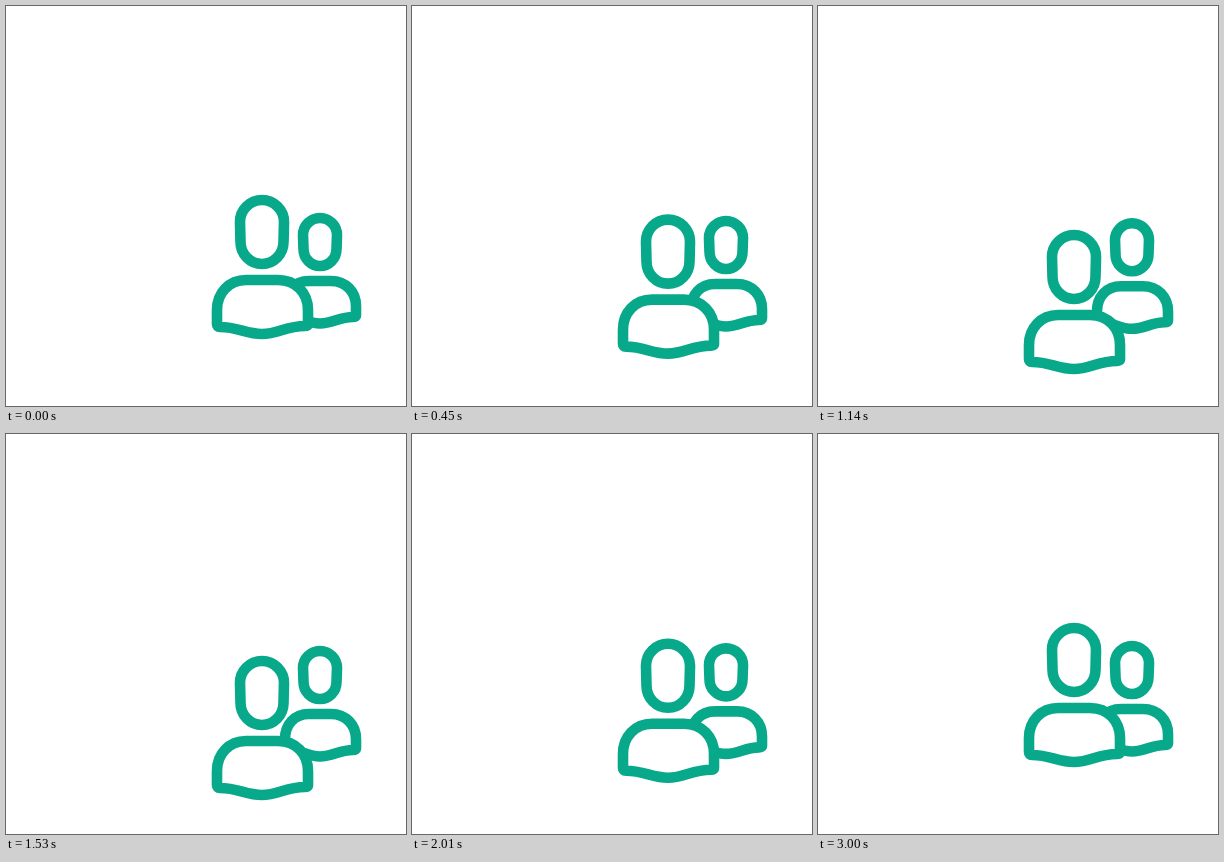
Animation, 400 px wide and 400 px high, one loop 3.03 s. Source, as an HTML page:

```html
<!DOCTYPE html>
<html lang="en">
<head>
<meta charset="utf-8">
<title>Two people</title>
<style>
  html, body { margin: 0; width: 100%; height: 100%; overflow: hidden; background: #fff; }
  svg { display: block; width: 100%; height: 100%; }
  path { fill: #fff; stroke: #08a88a; stroke-width: 10.6; stroke-linejoin: round; }
</style>
</head>
<body>
<svg viewBox="0 0 400 400">
  <g id="back">
    <path d="M297 229a17 17 0 0 1 34 0l-.5 14a16.5 17 0 0 1-33 0z"/>
    <path d="M279 309V300C279 286 288 275 303 275H325C340 275 350 286 350 300V309Q350 311 347 311C333 311 327 317.5 314 317.5S296 311 282 311Q279 311 279 309Z"/>
  </g>
  <g id="front">
    <path d="M234 216a22 22 0 0 1 44 0l-.5 20a21.5 22 0 0 1-43 0z"/>
    <path d="M211 318V304C211 287 223 274 240 274H272C290 274 302 287 302 304V318Q302 320 299 320C280 320 272 328 256 328S232 321 214 321Q211 321 211 318Z"/>
  </g>
</svg>
<script>
const LOOP = 3030, PEAK = 1200;
const back = document.getElementById('back');
const front = document.getElementById('front');

// Cubic bezier easing (.33, 0, .26, 1), solved by bisection
function ease(p) {
  let lo = 0, hi = 1, u;
  for (let i = 0; i < 24; i++) {
    u = (lo + hi) / 2;
    const x = 3 * u * (1 - u) * ((1 - u) * .33 + u * .26) + u ** 3;
    if (x < p) lo = u; else hi = u;
  }
  return u * u * (3 - 2 * u);
}

function draw(now) {
  const t = now % LOOP;
  // Down to the peak, then the same way back and a rest
  const p = Math.max(0, 1 - Math.abs(t - PEAK) / PEAK);
  const drop = ease(p);
  front.setAttribute('transform', `translate(0 ${35 * drop})`);
  back.setAttribute('transform', `translate(0 ${5.3 * drop})`);
}

const start = performance.now();
function tick() {
  draw(performance.now() - start);
  requestAnimationFrame(tick);
}
tick();
</script>
</body>
</html>
```
